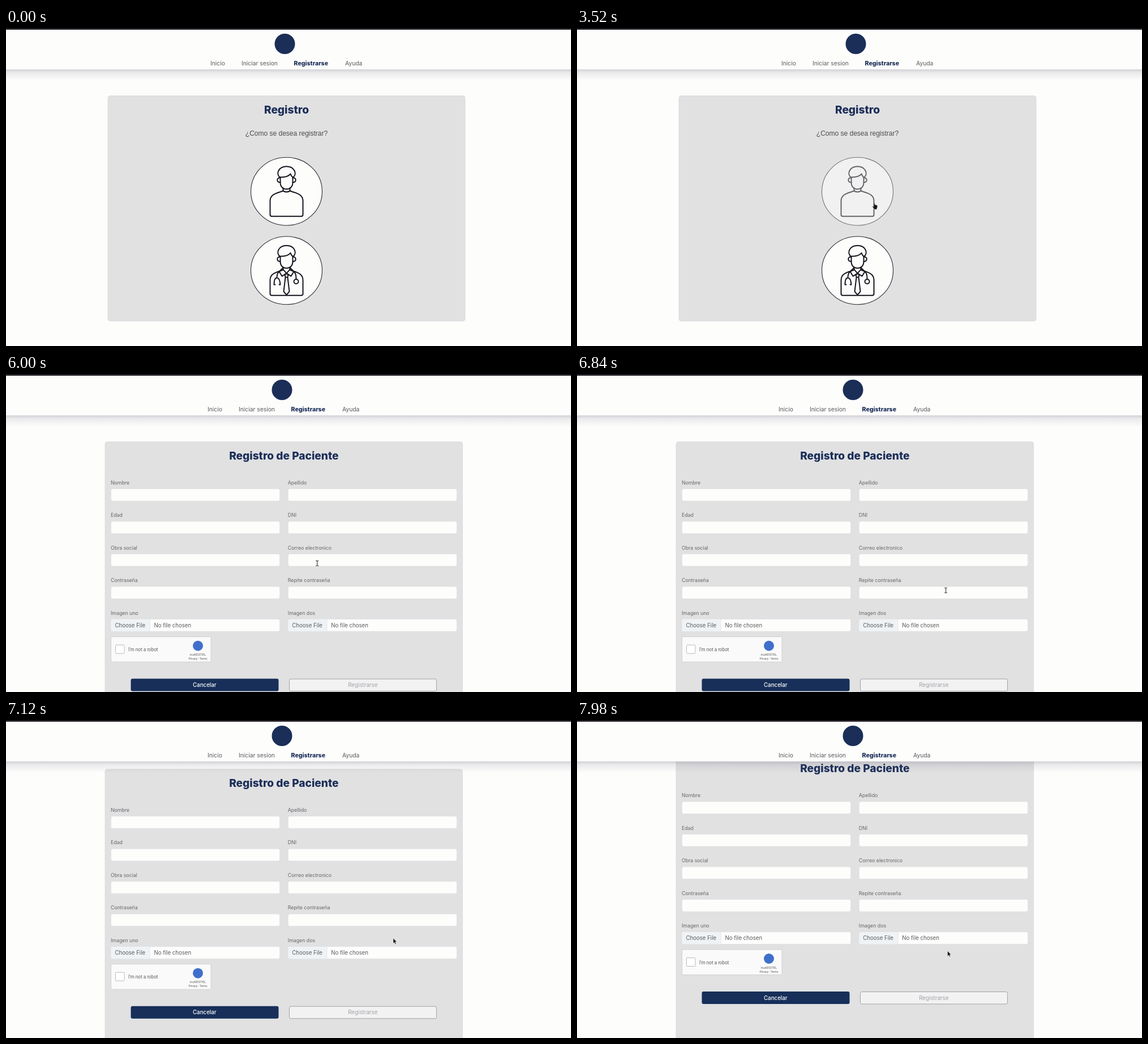
An HTML page that plays this animation: 998 by 561 pixels, repeating every 8000 ms.

```html
<!DOCTYPE html>
<html lang="es">
<head>
<meta charset="utf-8">
<title>Registro</title>
<style>
  html, body { margin: 0; width: 100%; height: 100%; overflow: hidden; background: #fdfdfc; }
  svg { display: block; width: 998px; height: 561px; }
  text { font-family: Inter, "Open Sans", sans-serif; fill: #5a5a5e; }
  .nav { font-size: 10.3px; }
  .nav .on { font-size: 10.6px; font-weight: 800; fill: #1b2e58; }
  .title { font-size: 19.1px; font-weight: 800; fill: #1b2e58; text-anchor: middle; }
  .ask { font: 12px "Liberation Sans", Arial, sans-serif; fill: #4c4c4e; text-anchor: middle; }
  .label { font-size: 8.75px; fill: #66666a; }
  .file { font-size: 9.65px; }
  .btn { font-size: 9.75px; text-anchor: middle; }
  .check { font-family: Roboto, sans-serif; }
  .card { fill: #e1e1e2; stroke: #d6d6d8; stroke-width: .6; }
  .field { fill: #fdfdfc; stroke: #d8d8dc; stroke-width: .5; }
  .icon { fill: none; stroke: #17131d; stroke-width: 2; stroke-linejoin: round; stroke-linecap: round; }
  .disc { fill: #fdfdfc; stroke: #2c2930; stroke-width: 1.1; }
</style>
</head>
<body>
<svg viewBox="0 0 998 561">
  <defs>
    <linearGradient id="shade" x2="0" y2="1">
      <stop offset="0" stop-color="#55556e" stop-opacity=".26"/>
      <stop offset=".3" stop-color="#55556e" stop-opacity=".11"/>
      <stop offset="1" stop-color="#55556e" stop-opacity="0"/>
    </linearGradient>
    <g id="head" class="icon">
      <path d="M-12-25C-19-31-14-44 0-44C14-44 19-31 12-25"/>
      <path d="M-11-25C-2-25 4-27 7-31Q8-27 11-25V-16C11-8 6-4 0-4S-11-8-11-16Z"/>
      <path d="M-11-24C-18-25-18-15-11-16M11-24C18-25 18-15 11-16"/>
    </g>
    <path id="torso" class="icon" d="M-6-5V-1C-16 3-29 4-29 17V41Q-29 44-26 44H26Q29 44 29 41V17C29 4 16 3 6-1V-5"/>
  </defs>

  <rect width="998" height="561" fill="#fdfdfc"/>

  <g id="choice">
    <rect class="card" x="180" y="119.5" width="631" height="397.5" rx="4"/>
    <text class="title" x="495.5" y="150.5">Registro</text>
    <text class="ask" x="495.5" y="190">¿Como se desea registrar?</text>
    <g id="patient" transform="translate(495.5 288.3)">
      <ellipse class="disc" rx="63" ry="60"/>
      <use href="#head"/>
      <use href="#torso"/>
      <path class="icon" d="M-6-1Q0 3 6-1"/>
    </g>
    <g transform="translate(495.5 427.8)">
      <ellipse class="disc" rx="63" ry="60"/>
      <use href="#head"/>
      <use href="#torso"/>
      <g class="icon" stroke-width="1.7">
        <path d="M-7-4L-13 2L-8 10L0 5L8 10L13 2L7-4M-6-2L0 5L6-2"/>
        <path d="M-3 7L0 5L3 7L2 12H-2ZM-2 12L-5 37L0 43L5 37L2 12"/>
        <path d="M-14 3Q-17 6-17 13M-22 25Q-22 13-17 13T-11 25M-22 25H-20M-11 25H-13"/>
        <path d="M14 3Q17 6 17 15"/>
        <circle cx="17" cy="19.5" r="4"/>
      </g>
    </g>
  </g>

  <g id="form">
    <rect class="card" x="175" y="119.5" width="631.5" height="560" rx="4"/>
    <text class="title" x="490.8" y="150.5">Registro de Paciente</text>
    <g id="fields"></g>
    <g id="robot">
      <rect x="185.5" y="463.5" width="176.5" height="44.5" rx="1.5" fill="#fafafa" stroke="#d0d0d2"/>
      <rect x="193.5" y="478" width="15.5" height="15" rx="1.5" fill="#fff" stroke="#b9b9bd"/>
      <text class="check" x="216" y="489" font-size="8.2" fill="#222">I'm not a robot</text>
      <circle cx="339" cy="479.5" r="9" fill="#3f6fcb"/>
      <g text-anchor="middle">
        <text class="check" x="339" y="497" font-size="6">truKESTEL</text>
        <text class="check" x="339" y="504" font-size="4.9">Privacy - Terms</text>
      </g>
    </g>
    <rect x="220.5" y="537.5" width="261" height="22" rx="3" fill="#172f59"/>
    <text class="btn" x="350.8" y="552" style="fill:#fff" font-weight="500">Cancelar</text>
    <rect x="500.5" y="538" width="260" height="21.5" rx="3" fill="#f2f2f3" stroke="#a0a0a8"/>
    <text class="btn" x="630.3" y="552" style="fill:#a2a2a7">Registrarse</text>
  </g>

  <rect width="998" height="73.5" fill="#fdfdfc"/>
  <rect y="73" width="998" height="20" fill="url(#shade)"/>
  <rect width="998" height="3" fill="#231e25"/>
  <g id="header" class="nav">
    <circle cx="492.5" cy="28" r="18" fill="#1b2e58"/>
    <text x="361" y="66.3">Inicio</text>
    <text x="416" y="66.3">Iniciar sesion</text>
    <text class="on" x="508.5" y="66.3">Registrarse</text>
    <text x="599" y="66.3">Ayuda</text>
  </g>

  <g id="cursor">
    <path id="arrow" d="M0 0V9L2 7.2L3.4 10.3L4.9 9.6L3.5 6.6H6.2Z" fill="#111" stroke="#eee" stroke-width=".5"/>
    <path id="hand" d="M-2 0Q-1-1 0 0L.4 3L4 4Q5.5 4.4 5 7L4 10V11.5H-1.2V10L-4 6.5Q-3.6 5-1.6 6.3Z" fill="#151515" stroke="#eee" stroke-width=".5"/>
    <path id="beam" d="M-2.5-4.5Q0-4.5 0-3.5Q0-4.5 2.5-4.5M0-4V4M-2.5 4.5Q0 4.5 0 3.5Q0 4.5 2.5 4.5" fill="none" stroke="#444" stroke-width="1.2"/>
  </g>
</svg>

<script>
const LOOP = 8000;
const $ = id => document.getElementById(id);

const rows = [
  ['Nombre', 'Apellido'], ['Edad', 'DNI'], ['Obra social', 'Correo electronico'],
  ['Contraseña', 'Repite contraseña'], ['Imagen uno', 'Imagen dos']
];

function field(label, x, y, isFile) {
  const picker = isFile ? `
    <path d="M${x + 3} ${y + 11.3}H${x + 69}V${y + 32.2}H${x + 3}Q${x + .5} ${y + 32.2} ${x + .5} ${y + 29}V${y + 14}Q${x + .5} ${y + 11.3} ${x + 3} ${y + 11.3}Z" fill="#eff3f6"/>
    <path d="M${x + 69} ${y + 11.3}v21" stroke="#dde1e6" stroke-width=".8"/>
    <text class="file" x="${x + 7.5}" y="${y + 25}">Choose File</text>
    <text class="file" x="${x + 76.5}" y="${y + 25}">No file chosen</text>` : '';
  return `<text class="label" x="${x}" y="${y + 3.3}">${label}</text>
    <rect class="field" x="${x + .5}" y="${y + 11}" width="298" height="21.5" rx="3"/>${picker}`;
}

$('fields').innerHTML = rows.map((pair, r) =>
  pair.map((label, c) => field(label, 185 + 312.8 * c, 191.5 + 57.5 * r, r === 4)).join('')
).join('');

// Keys are [time, ...values]; values ease between neighbouring keys.
function track(keys, t) {
  if (t <= keys[0][0]) return keys[0].slice(1);
  const i = keys.findIndex(k => k[0] > t);
  if (i < 0) return keys[keys.length - 1].slice(1);
  const a = keys[i - 1], b = keys[i];
  const u = (t - a[0]) / (b[0] - a[0]), e = u * u * (3 - 2 * u);
  return a.slice(1).map((v, n) => v + (b[n + 1] - v) * e);
}

const pointer = [
  [1140, 997, 383], [1240, 990, 382], [1560, 990, 382], [1660, 992, 384],
  [2120, 992, 384], [2360, 984, 382], [2640, 955, 380], [2930, 860, 384],
  [3250, 610, 338], [3500, 525.7, 308.5], [5760, 525.7, 308.5],
  [6180, 565, 350], [6560, 619, 378], [6840, 651.5, 381.5],
  [7120, 684, 385], [7300, 688, 388], [7400, 688, 388], [7960, 654.5, 407.5]
];
const scroll = [[6850, 0], [7120, 32.8], [7300, 44], [7400, 44], [7960, 58.5]];
const patientFade = [[3320, 1], [3510, .6]];
const formFade = [[4320, 0], [4620, 1]];
const robotFade = [[5190, 0], [5340, 1]];

const show = (id, on) => $(id).setAttribute('visibility', on ? 'visible' : 'hidden');
const fade = (id, keys, t) => $(id).setAttribute('opacity', track(keys, t)[0]);
const move = (id, x, y) => $(id).setAttribute('transform', `translate(${x} ${y})`);

function draw(t) {
  const onForm = t >= 4320;
  const [x, y] = track(pointer, t);
  const [offset] = track(scroll, t);

  show('choice', !onForm);
  show('form', onForm);
  fade('patient', patientFade, t);
  fade('form', formFade, t);
  fade('robot', robotFade, t);
  move('form', 0, -offset);
  move('header', onForm ? -5 : 0, 0);

  const overPatient = !onForm && Math.hypot((x - 495.5) / 63, (y - 288.3) / 60) < 1;
  const rowY = (y + offset - 202.5) % 57.5;
  const overInput = onForm && x > 498 && x < 796 && y + offset < 397 && rowY > 0 && rowY < 21.5;
  const visible = t >= 1140;
  show('hand', visible && overPatient);
  show('beam', visible && overInput);
  show('arrow', visible && !overPatient && !overInput);
  move('cursor', x, y);
}

const start = performance.now();
function tick() {
  draw((performance.now() - start) % LOOP);
  requestAnimationFrame(tick);
}
tick();
</script>
</body>
</html>
```
